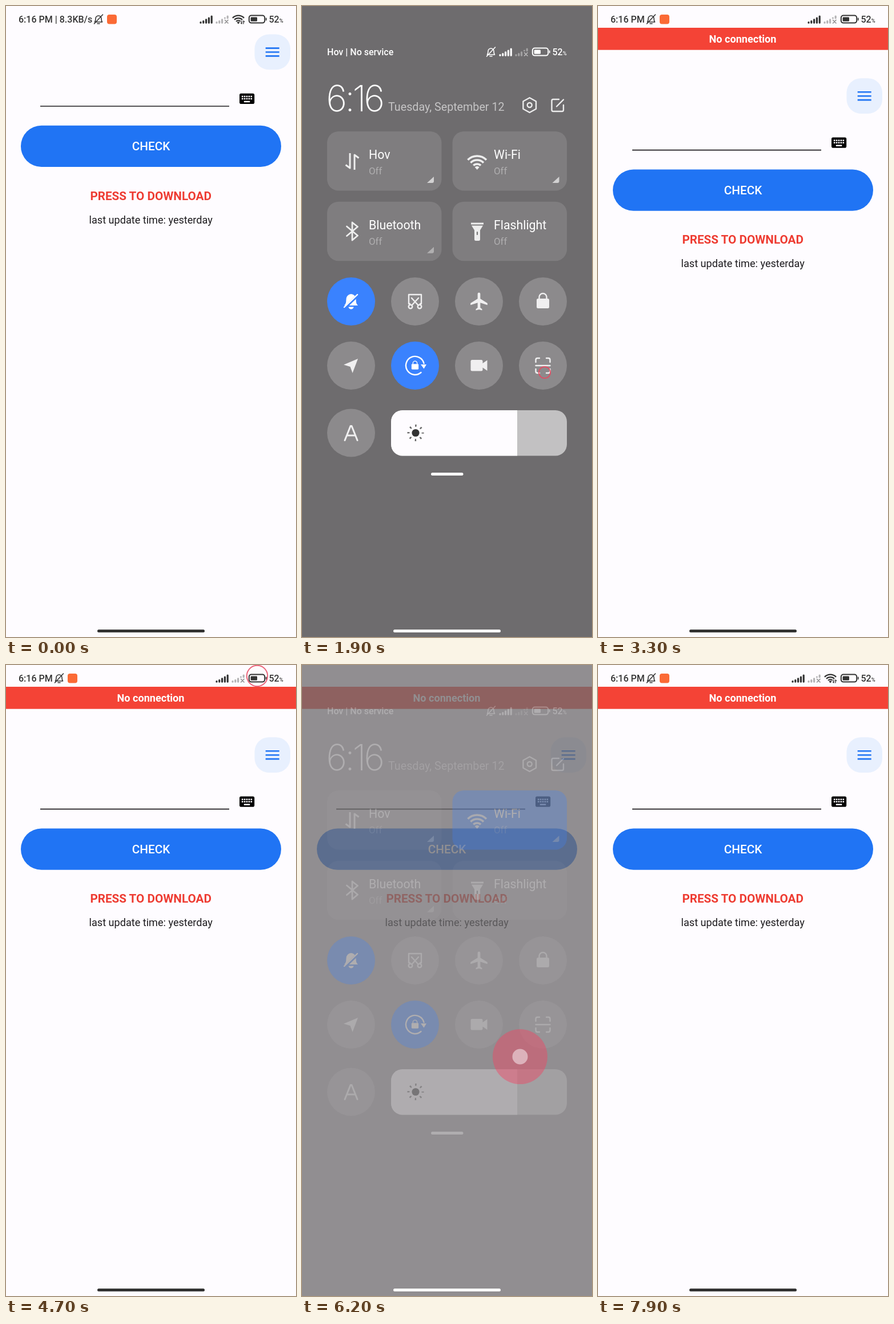
These frames come from a looping animation (508 px wide and 1102 px high, 8 s). An HTML page:

```html
<!DOCTYPE html>
<html lang="en">
<head>
<meta charset="utf-8">
<title>Connection check</title>
<style>
  html, body { margin: 0; width: 100%; height: 100%; overflow: hidden; background: #fefcff; }
  svg { display: block; width: 508px; height: 1102px; font-family: Roboto, sans-serif; }
  .mid { text-anchor: middle; }
  .status { font-size: 16px; font-weight: 500; }
  .label { font-size: 21.3px; }
  .sub { font-size: 16.9px; opacity: .38; }
  .line { fill: none; stroke: currentColor; stroke-width: 2.4; stroke-linecap: round; stroke-linejoin: round; }
  .glyph { opacity: .87; }
</style>
</head>
<body>
<svg viewBox="0 0 508 1102">
  <defs>
    <g id="bell">
      <path class="line" style="stroke-width:1.6" d="M-6.5 5C-5 3-5 1-5-1A5 5 0 0 1 5-1C5 1 5 3 6.5 5ZM-2 7.8H2M-7.5 8L7.5-8"/>
    </g>
    <g id="wifi">
      <path class="line" style="stroke-width:3.6;stroke-linecap:butt" d="M-16.3-16.3A23 23 0 0 1 16.3-16.3M-11.3-11.3A16 16 0 0 1 11.3-11.3M-6.4-6.4A9 9 0 0 1 6.4-6.4"/>
      <path d="M0 1L-4-3.5A5.6 5.6 0 0 1 4-3.5Z"/>
    </g>
    <g id="signals">
      <path class="line" style="stroke-width:3.2" d="M341 29.2V28.6M345.8 29.2V26.5M350.6 29.2V23.8M355.4 29.2V21M360.2 29.2V18"/>
      <path class="line" opacity=".36" style="stroke-width:3.2" d="M369 29.2V28.6M373.8 29.2V26.5M378.6 29.2V23.8M383.4 21V21M388.2 21V18"/>
      <path class="line" opacity=".55" style="stroke-width:1.6" d="M383.5 24.5L389 30M389 24.5L383.5 30"/>
    </g>
    <g id="statusWifi">
      <use href="#wifi" transform="translate(407 31) scale(.62)"/>
      <path class="line" style="stroke-width:1.3" d="M413 26V31L411.5 29.5M416 31V26L417.5 27.5"/>
    </g>
    <g id="battery">
      <rect class="line" x="425.8" y="16.6" width="27.4" height="13" rx="4" style="stroke-width:2"/>
      <rect x="428.6" y="19.4" width="11.4" height="7.4" rx="1.4"/>
      <rect x="454.8" y="20.5" width="1.8" height="5" rx=".9"/>
      <text class="status" x="460.5" y="29">52<tspan font-size="9.5">%</tspan></text>
    </g>
    <rect id="tile" width="200.5" height="103.5" rx="20"/>
    <circle id="disc" r="42"/>
    <path id="corner" d="M187 79v8q0 3-3 3h-9z" opacity=".65"/>
    <g id="padlock">
      <rect x="-11" y="-5" width="22" height="17" rx="2.5"/>
      <path class="line" d="M-6.5-5V-8A6.5 6 0 0 1 6.5-8V-5"/>
    </g>
    <clipPath id="labelClip"><rect x="336" y="240" width="107" height="40"/></clipPath>
    <clipPath id="sliderClip"><rect x="156" y="706" width="308" height="79.5" rx="20"/></clipPath>
  </defs>

  <rect width="508" height="1102" fill="#fefcff"/>

  <g id="statusBar" fill="#333" color="#333">
    <text class="status" x="22" y="29">6:16 PM<tspan class="speed"> | 8.3KB/s</tspan></text>
    <g id="notices">
      <use href="#bell" x="162" y="23"/>
      <rect x="177" y="15" width="17" height="16.5" rx="4" fill="#fb6a35"/>
    </g>
    <use class="shifting" href="#signals"/>
    <use class="online" href="#statusWifi"/>
    <use href="#battery"/>
  </g>

  <g id="banner">
    <rect y="38" width="508" height="38.7" fill="#f44336"/>
    <text class="mid" x="253.5" y="63.5" font-size="18.1" font-weight="700" fill="#fff">No connection</text>
  </g>

  <g id="page">
    <rect x="435.5" y="49.5" width="62.5" height="61.7" rx="25" fill="#e8f0fe"/>
    <path d="M454.7 73.6h24M454.7 80.5h24M454.7 87.4h24" stroke="#2074f4" stroke-width="2.6"/>
    <path d="M60 175H391" stroke="#1d1b1e" stroke-width="1.7"/>
    <rect x="409" y="152.7" width="26.2" height="18.4" rx="2.8"/>
    <path d="M412.9 158H431.2M412.9 162H431.2" stroke="#fefcff" stroke-width="2.5" stroke-dasharray="2.6 1.3"/>
    <path d="M416.8 167h10.5" stroke="#fefcff" stroke-width="2.5"/>
    <rect x="26" y="208.7" width="456" height="72.3" rx="36.1" fill="#2074f4"/>
    <text class="mid" x="254" y="252" font-size="20.7" font-weight="500" fill="#fff">CHECK</text>
    <text class="mid" x="253.7" y="338.5" font-size="20.7" font-weight="700" fill="#ee3c32">PRESS TO DOWNLOAD</text>
    <text class="mid" x="253.7" y="379.5" font-size="18.1" fill="#1d1b1e">last update time: yesterday</text>
  </g>

  <rect id="scrim" width="508" height="1102" fill="#6e6c6e"/>

  <g id="panel" fill="#fff" color="#fff">
    <text class="status" x="44" y="86">Hov | No service</text>
    <text class="status speed" x="233.5" y="86">8.3KB/s</text>
    <g transform="translate(-22 57)">
      <use class="shifting" href="#bell" x="325" y="23"/>
      <use class="shifting" href="#signals"/>
      <use class="online" href="#statusWifi"/>
      <use href="#battery"/>
    </g>

    <text class="mid" x="60.5 84 100.5 126.5" y="184" font-size="63" font-weight="200" style="font-family:Inter,sans-serif">6:16</text>
    <text x="151" y="183" font-size="19.7" opacity=".6">Tuesday, September 12</text>
    <g class="line glyph">
      <path d="M398.7 160.2L410 166.5V179.7L398.7 186L387.4 179.7V166.5Z"/>
      <circle cx="398.7" cy="173" r="4"/>
      <path d="M450 163H440Q437.5 163 437.5 165.5V181.5Q437.5 184 440 184H455.500Q458 184 458 181.500V173M446 175.500L458 163.500"/>
    </g>

    <g opacity=".12">
      <use href="#tile" x="44" y="219"/><use href="#tile" x="263.5" y="219"/>
      <use href="#tile" x="44" y="341.7"/><use href="#tile" x="263.5" y="341.7"/>
    </g>
    <use id="wifiOn" href="#tile" x="263.5" y="219" fill="#3a82fe"/>
    <use href="#corner" x="44" y="219"/><use href="#corner" x="263.5" y="219"/>
    <use href="#corner" x="44" y="341.7" opacity=".6"/>

    <g class="glyph">
      <path class="line" style="stroke-width:3;stroke-linecap:butt" d="M76.500 277.500L84 283V257M99.500 265.500L92 260V286"/>
      <use href="#wifi" x="306.7" y="285"/>
      <path class="line" style="stroke-width:2.8" d="M78.500 385L97.500 401L88 409V378L97.500 385.500L78.500 401.500"/>
      <path d="M296 378.500h22v3h-22zM297 383.500h20l-5 8v16q0 2.500-2.500 2.500h-5q-2.500 0-2.500-2.500v-16z"/>
      <path d="M307 395v4" stroke="#777" stroke-width="2.200" stroke-linecap="round"/>
    </g>

    <text class="label" x="117" y="267">Hov</text><text class="sub" x="117" y="294">Off</text>
    <g clip-path="url(#labelClip)"><text id="wifiName" class="label" y="267"></text></g>
    <text id="wifiState" class="sub" x="336" y="294"></text>
    <text class="label" x="117" y="389.500">Bluetooth</text><text class="sub" x="117" y="416.500">Off</text>
    <text class="label" x="336" y="389.500">Flashlight</text><text class="sub" x="336" y="416.500">Off</text>

    <g opacity=".21">
      <use href="#disc" x="198" y="516"/><use href="#disc" x="310" y="516"/><use href="#disc" x="422" y="516"/>
      <use href="#disc" x="86" y="628"/><use href="#disc" x="310" y="628"/><use href="#disc" x="422" y="628"/>
      <use href="#disc" x="86" y="745.500"/>
    </g>
    <g fill="#3a82fe"><use href="#disc" x="86" y="516"/><use href="#disc" x="198" y="628"/></g>

    <g transform="translate(86 515)">
      <path d="M-12 8C-8 4-9 1-8.500-3A8.500 9 0 0 1 8.500-3C9 1 8 4 12 8ZM-4.500 10.500H4.500A4.500 4 0 0 1-4.500 10.500Z"/>
      <path d="M-11 12L13-11" stroke="#3a82fe" stroke-width="5"/>
      <path class="line" d="M-12 11L11-11"/>
    </g>
    <g class="glyph">
      <g class="line" transform="translate(198 516)">
        <path d="M-9 4H-11V-12H11V4H9M-6-6L5.500 6.500M6-6L-5.500 6.500"/>
        <circle cx="-8" cy="9" r="3.300"/><circle cx="8" cy="9" r="3.300"/>
      </g>
      <path transform="translate(310 516) scale(1.56) translate(-11.5 -12)" d="M21 16v-2l-8-5V3.500a1.500 1.500 0 0 0-3 0V9l-8 5v2l8-2.500V19l-2 1.500V22l3.500-1 3.500 1v-1.500L13 19v-5.500z"/>
      <use href="#padlock" x="422" y="516"/>
      <path transform="translate(86 628)" d="M12-12L2.500 13L-1.500 2L-13-1.500Z"/>
      <path d="M298 618h16q2.500 0 2.500 2.500v3.500l8-5.500v18.500l-8-5.500v3.500q0 2.500-2.500 2.500h-16q-2.500 0-2.500-2.500v-14.500q0-2.500 2.500-2.500z"/>
      <path class="line" transform="translate(422 628)" d="M-12.500-6V-10Q-12.500-13-9.500-13H-6M6-13H9.500Q12.500-13 12.500-10V-6M12.500 6V10Q12.500 13 9.500 13H6M-6 13H-9.500Q-12.500 13-12.500 10V6M-12.500 0H12.500"/>
      <path class="line" style="stroke-width:3" transform="translate(86 745.500)" d="M-11 13L-1-12H1L11 13M-7.500 4.500H7.500"/>
    </g>
    <g transform="translate(198 628)">
      <path class="line" d="M10.500 12A16 16 0 1 1 15.500-4"/>
      <path d="M10-2H20L15.500 5.500Z"/>
      <use href="#padlock" transform="scale(.56)"/>
    </g>

    <g clip-path="url(#sliderClip)">
      <rect x="156" y="706" width="308" height="80" opacity=".58"/>
      <rect x="156" y="706" width="221" height="80" fill="#fefcff"/>
    </g>
    <circle cx="199" cy="745.500" r="6.600" fill="#333"/>
    <circle cx="199" cy="745.500" r="12.500" fill="none" stroke="#666" stroke-width="4" stroke-dasharray="2.400 7.417" stroke-dashoffset="1.200"/>
    <rect x="226" y="815" width="56.500" height="5" rx="2.500"/>
  </g>

  <rect id="homeBar" x="160" y="1089" width="188" height="5" rx="2.500"/>
  <g id="touches"></g>
</svg>

<script>
const LOOP = 8000, WIFI_OFF = 1500, WIFI_ON = 5550, BANNER = 1700, RECONNECT = 7900;
const $ = id => document.getElementById(id);
const all = selector => document.querySelectorAll(selector);
const clamp = v => Math.min(1, Math.max(0, v));
const mix = (a, b, p) => a + (b - a) * p;

// Piecewise linear value over [time, value] pairs.
function track(keys, t) {
  const next = keys.findIndex(k => k[0] > t);
  if (next < 0) return keys[keys.length - 1][1];
  if (next === 0) return keys[0][1];
  const [t0, v0] = keys[next - 1], [t1, v1] = keys[next];
  return mix(v0, v1, (t - t0) / (t1 - t0));
}

const scrimKeys = [[300, 0], [800, .95], [900, .97], [1050, 1], [2075, 1], [2575, 0],
                   [4750, 0], [5080, 1], [6080, 1], [6580, 0]];
const panelKeys = [[300, 0], [800, 1], [2075, 1], [2242, 0], [4750, 0], [5050, 1], [6080, 1], [6247, 0]];
const offsetKeys = [[300, -45], [700, 16], [900, 6], [1100, 0], [4749, 0], [4750, -45], [4980, 8], [5150, 0]];
const statusKeys = [[250, 1], [350, 0], [2750, 0], [2950, 1], [4720, 1], [4800, 0], [6700, 0], [6900, 1]];
const homeKeys = [[300, 51], [800, 20], [950, 20], [1150, 255], [2750, 255], [2950, 51],
                  [5100, 50], [5300, 255], [6700, 255], [6900, 51]];

const touches = [
  { down: 200, up: 650, from: [440, 19], to: [430, 420] },
  { down: 1350, up: 1480, from: [375, 271], to: [375, 271] },
  { down: 1900, up: 2230, from: [425, 640], to: [407, 267] },
  { down: 2300, up: 2620, from: [439, 612], to: [420, 290] },
  { down: 4600, up: 4900, from: [440, 19], to: [432, 400] },
  { down: 5400, up: 5530, from: [375, 271], to: [375, 271] },
  { down: 5900, up: 6400, from: [385, 780], to: [373, 400] },
];
const [pointers] = [touches.map(() => {
  const group = document.createElementNS("http://www.w3.org/2000/svg", "g");
  group.innerHTML = '<circle fill="#f04664" stroke="#e8485f" stroke-width="2"/><circle r="13.500" fill="#fff"/>';
  return $("touches").appendChild(group);
})];

function drawTouch(touch, group, t) {
  const age = t - touch.down;
  const fade = 1 - clamp((t - touch.up) / 250);
  group.setAttribute("opacity", age < 0 ? 0 : fade);
  const move = clamp((age - 100) / (touch.up - touch.down - 100)) ** 2;
  const [x, y] = touch.from.map((v, i) => mix(v, touch.to[i], move));
  group.setAttribute("transform", `translate(${x} ${y})`);
  const filled = clamp((age - 100) / 120);
  const [halo, dot] = group.children;
  halo.setAttribute("r", age < 100 ? mix(10, 18, clamp(age / 100)) : mix(18, 48, filled));
  halo.setAttribute("fill-opacity", .46 * filled);
  halo.setAttribute("stroke-opacity", .85 * (1 - filled));
  dot.setAttribute("opacity", .48 * filled);
}

function draw(t) {
  const named = t < WIFI_OFF, online = named || t >= RECONNECT;
  const shift = online ? 0 : 28;
  all(".speed").forEach(el => el.style.display = named ? "" : "none");
  all(".online").forEach(el => el.style.display = online ? "" : "none");
  all(".shifting").forEach(el => el.setAttribute("transform", `translate(${shift} 0)`));
  $("notices").setAttribute("transform", `translate(${named ? 0 : -69} 0)`);
  $("statusBar").setAttribute("opacity", track(statusKeys, t));

  const banner = t >= BANNER;
  $("banner").style.display = banner ? "" : "none";
  $("page").setAttribute("transform", `translate(0 ${banner ? 76.700 : 0})`);

  $("scrim").setAttribute("opacity", track(scrimKeys, t));
  $("panel").setAttribute("opacity", track(panelKeys, t));
  $("panel").setAttribute("transform", `translate(0 ${track(offsetKeys, t)})`);
  $("wifiOn").setAttribute("opacity", track([[WIFI_OFF, 1], [WIFI_OFF + 150, 0], [WIFI_ON, 0], [WIFI_ON + 150, 1]], t));
  $("wifiName").textContent = named ? "Development" : "Wi-Fi";
  $("wifiName").setAttribute("x", 336 - (named ? Math.max(0, t - 650) * .028 : 0));
  $("wifiState").textContent = named ? "Connected" : "Off";

  const grey = Math.round(track(homeKeys, t));
  $("homeBar").setAttribute("fill", `rgb(${grey},${grey},${grey})`);
  touches.forEach((touch, i) => drawTouch(touch, pointers[i], t));
}

const start = performance.now();
function tick() {
  draw((performance.now() - start) % LOOP);
  requestAnimationFrame(tick);
}
tick();
</script>
</body>
</html>
```
